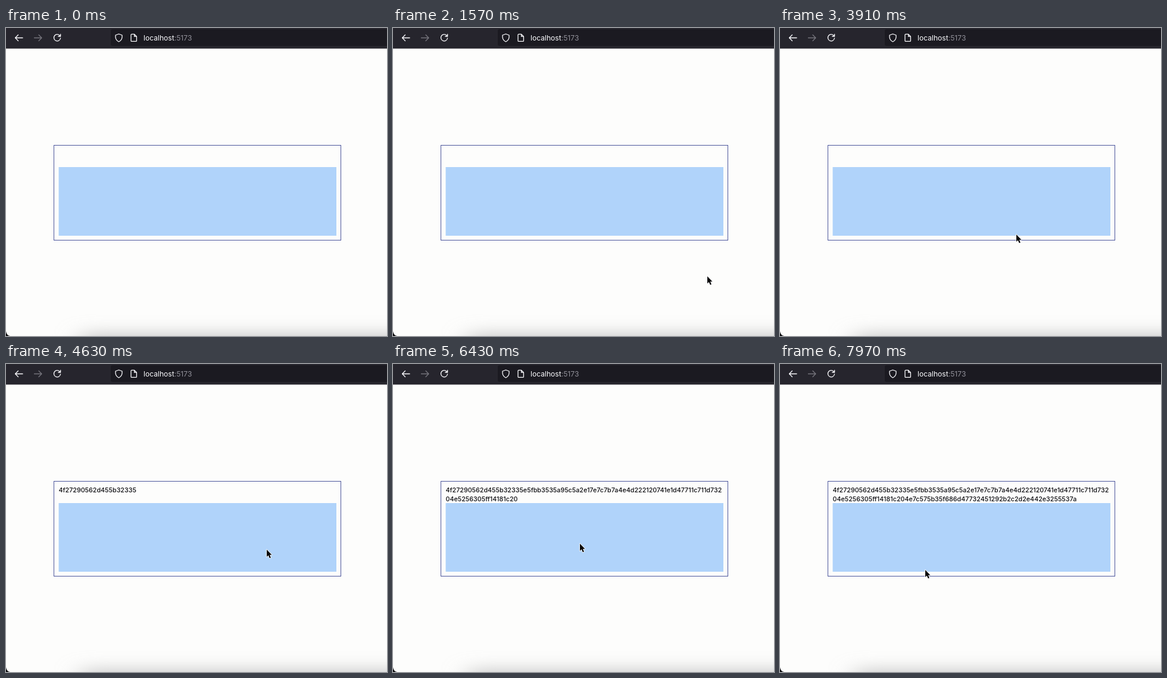
Write an HTML page that moves like this. It is 640 px wide and 516 px high and loops after 7.99 s.

```html
<!DOCTYPE html>
<html lang="en">
<head>
<meta charset="utf-8">
<title>Mouse entropy</title>
<style>
  html, body { margin: 0; width: 100%; height: 100%; overflow: hidden; background: #fdfdfc; }
  svg { display: block; width: 100vw; height: 100vh; }
  text { font-family: Inter, Roboto, sans-serif; white-space: pre; }
  .icon { fill: none; stroke: #fbfbfe; stroke-width: 1.3; stroke-linecap: round; stroke-linejoin: round; }
  .dim { stroke: #75747c; }
  .url { font-size: 12.1px; fill: #fbfbfe; }
  .port { fill: #908f98; }
  .hash { font-size: 10.72px; font-weight: 500; fill: #0c0c10; }
</style>
</head>
<body>
<svg viewBox="0 0 640 516" xmlns="http://www.w3.org/2000/svg">
  <defs>
    <filter id="soft" x="-20%" y="-200%" width="140%" height="500%">
      <feGaussianBlur stdDeviation="20 14"/>
    </filter>
  </defs>

  <rect width="640" height="516" fill="#fdfdfc"/>
  <rect x="126" y="513" width="640" height="60" fill="#c6c6c6" filter="url(#soft)"/>
  <path d="M0 508 Q1 515 7 516 H0 Z" fill="#0c0c0e"/>

  <rect width="640" height="34.5" fill="#26252d"/>
  <path d="M640 2 H179 Q176 2 176 5 V27 Q176 30 179 30 H640 Z" fill="#1b1a21"/>
  <g class="icon">
    <path d="M28 16.5 H15.5 M20.5 11.5 L15.5 16.5 L20.5 21.5"/>
    <path class="dim" d="M47.5 16.5 H60 M55 11.5 L60 16.5 L55 21.5"/>
    <path d="M90.6 13 A5.6 5.6 0 1 0 91.6 16.8 M91.6 10.3 V14 H87.8"/>
    <path d="M189.5 10 L195 12 V15.5 Q194.5 20.5 189.5 23 Q184.5 20.5 184 15.5 V12 Z"/>
    <path d="M210 11.6 Q210 10.4 211.2 10.4 H215.6 L219.4 14.2 V21.2 Q219.4 22.4 218.2 22.4 H211.2 Q210 22.4 210 21.2 Z M215.6 10.4 V14.2 H219.4"/>
  </g>
  <text class="url" x="231" y="20.8">localhost<tspan class="port">:5173</tspan></text>

  <rect x="80.5" y="196.5" width="482" height="159" fill="none" stroke="#4c569c"/>
  <rect x="88.5" y="233" width="466.5" height="115" fill="#b0d3fa"/>
  <text class="hash" id="line1" x="88.5" y="215.4"></text>
  <text class="hash" id="line2" x="88.5" y="230"></text>

  <path id="cursor" d="M0 0 V12 L2.7 9.5 L4.8 14.3 L6.9 13.4 L4.9 8.7 H8.5 Z"
        fill="#060608" stroke="#fefefe" stroke-width="1.6" stroke-linejoin="round" paint-order="stroke"/>
</svg>

<script>
const LOOP = 7990;
const WRAP = 75;
const HASH = '4f27290562d455b32335e5fbb3535a95c5a2e17e7c7b7a4e4d22' +
  '2120741e1d47711c711d732' +
  '04e5256305ff14181c204e7c575b35f686d47732451292b2c2d2e442e3255537a';

// Pointer tip: [step, x, y]
const PATH = [
  [27, 645, 450], [35, 528, 416], [66, 431, 390], [84, 397, 346],
  [90, 404, 341], [100, 438, 311], [116, 470, 284], [127, 395, 287],
  [138, 314, 301], [150, 214, 328], [158, 168, 350], [164, 190, 364], [171, 244, 345]
];
// Characters collected: [step, count]
const TYPED = [[90, 0], [116, 52], [138, 95], [158, 135], [168, 135], [171, 140]];

const $ = id => document.getElementById(id);
const line1 = $('line1'), line2 = $('line2'), cursor = $('cursor');

// Updates come in bursts: three steps at 0, 20 and 40 ms of every 140 ms.
function stepAt(ms) {
  const t = ms + 10;
  return 3 * Math.floor(t / 140) + Math.min(2, Math.floor((t % 140) / 20));
}

function segment(keys, n) {
  let i = 0;
  while (i < keys.length - 2 && n >= keys[i + 1][0]) i++;
  const span = keys[i + 1][0] - keys[i][0];
  return { i, span, u: Math.min(1, Math.max(0, (n - keys[i][0]) / span)) };
}

function slope(keys, i, axis) {
  const rate = k => (keys[k + 1][axis] - keys[k][axis]) / (keys[k + 1][0] - keys[k][0]);
  if (i === 0) return rate(0);
  if (i === keys.length - 1) return rate(i - 1);
  const a = rate(i - 1), b = rate(i);
  return a * b > 0 ? 2 * a * b / (a + b) : 0;
}

function smooth(keys, n, axis) {
  const { i, span, u } = segment(keys, n);
  const p = keys[i][axis], q = keys[i + 1][axis], v = 1 - u;
  return p * v * v * (1 + 2 * u) + q * u * u * (3 - 2 * u) +
    span * u * v * (v * slope(keys, i, axis) - u * slope(keys, i + 1, axis));
}

function linear(keys, n) {
  const { i, u } = segment(keys, n);
  return keys[i][1] + (keys[i + 1][1] - keys[i][1]) * u;
}

function draw(ms) {
  const n = stepAt(ms);
  const text = HASH.slice(0, Math.round(linear(TYPED, n)));
  line1.textContent = text.slice(0, WRAP);
  line2.textContent = text.slice(WRAP);
  cursor.style.display = n < PATH[0][0] ? 'none' : '';
  cursor.setAttribute('transform', `translate(${smooth(PATH, n, 1)} ${smooth(PATH, n, 2)})`);
}

const start = performance.now();
function tick() {
  draw((performance.now() - start) % LOOP);
  requestAnimationFrame(tick);
}
tick();
</script>
</body>
</html>
```
